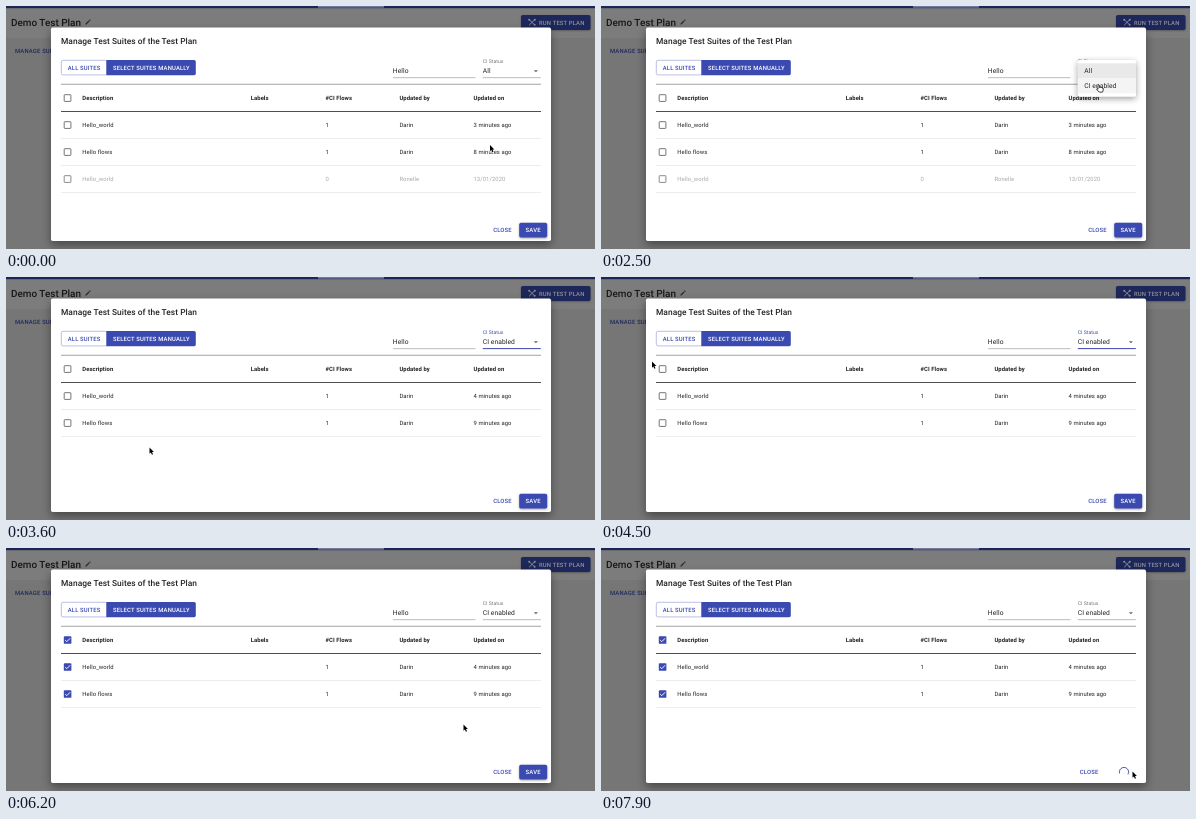
Animation, 589 px wide and 243 px high, one loop 8 s. Source, as an HTML page with a canvas:

```html
<!DOCTYPE html>
<html lang="en">
<head>
<meta charset="utf-8">
<title>Manage Test Suites</title>
<style>
html, body { margin: 0; width: 100%; height: 100%; overflow: hidden; background: #767676; }
canvas { display: block; width: 589px; height: 243px; }
</style>
</head>
<body>
<canvas id="stage"></canvas>
<script>
const W = 589, H = 243, LOOP = 8000, STEP = 100;
const BLUE = '#3a4ab0', INK = '#232323', DIM = '#a9a9a9';
const BODY = 5.88, FIELD = 6.7;
const OPEN = 1300, PICK = 2600, LOADED = 3300, CHECK = 5400, SAVING = 7400;
const COLS = [76.3, 244.8, 319.5, 393.4, 467.5];

const canvas = document.getElementById('stage');
const ctx = canvas.getContext('2d');
const dpr = window.devicePixelRatio || 1;
canvas.width = Math.round(W * dpr);
canvas.height = Math.round(H * dpr);

// Pointer path: time, x, y of the tip
const PATH = [
  [0, 484, 139], [300, 485, 116], [600, 488, 74], [800, 488, 64.5],
  [1700, 488, 64.5], [1900, 497, 78], [2500, 497, 78.5],
  [2700, 488, 86], [3100, 386, 132.5], [3300, 255, 158.5],
  [3600, 143.5, 170.5], [3800, 143.5, 170.5], [4200, 80, 122], [4500, 51, 84.5],
  [4700, 61, 89.5], [4800, 61, 89.5], [4900, 62.5, 90.5],
  [5500, 62.5, 90.5], [5800, 189, 109], [5900, 189, 109],
  [6200, 457.5, 176.5], [6400, 567.5, 217], [6600, 567.5, 217],
  [6800, 540, 218], [6900, 540, 218], [7200, 531.5, 223.5], [8000, 531.5, 223.5]
];

const clamp = v => Math.max(0, Math.min(1, v));
const between = (t, a, b) => t >= a && t < b;
const smooth = v => v * v * (3 - 2 * v);

function pointerAt(t) {
  let i = 1;
  while (i < PATH.length - 1 && PATH[i][0] < t) i++;
  const [t0, x0, y0] = PATH[i - 1], [t1, x1, y1] = PATH[i];
  const k = clamp((t - t0) / (t1 - t0));
  return [x0 + (x1 - x0) * k, y0 + (y1 - y0) * k];
}

// y is the middle of the capital letters
function text(str, x, y, { size = BODY, weight = 400, color = INK, gap = 0.0107 } = {}) {
  ctx.font = `${weight} ${size}px Roboto, sans-serif`;
  ctx.letterSpacing = gap * size + 'px';
  ctx.textRendering = 'geometricPrecision';
  ctx.fillStyle = color;
  ctx.fillText(str, x, y + size * 0.355);
}

const label = (str, x, y, color) => text(str, x, y, { weight: 500, color, gap: 0.0286 });

function rect(x, y, w, h, color) {
  ctx.fillStyle = color;
  ctx.fillRect(x, y, w, h);
}

function box(x, y, w, h, r, color) {
  ctx.beginPath();
  ctx.roundRect(x, y, w, h, r);
  ctx.fillStyle = color;
  ctx.fill();
}

function shadowBox(x, y, w, h, r, color, blur, dy, alpha) {
  ctx.save();
  ctx.shadowColor = `rgba(0,0,0,${alpha})`;
  ctx.shadowBlur = blur * dpr;
  ctx.shadowOffsetY = dy * dpr;
  box(x, y, w, h, r, color);
  ctx.restore();
}

function line(points, color, width) {
  ctx.beginPath();
  points.forEach(([x, y]) => ctx.lineTo(x, y));
  ctx.strokeStyle = color;
  ctx.lineWidth = width;
  ctx.stroke();
}

function shape(points, color) {
  ctx.beginPath();
  points.forEach(([x, y]) => ctx.lineTo(x, y));
  ctx.closePath();
  ctx.fillStyle = color;
  ctx.fill();
}

function drawPage() {
  rect(0, 0, W, H, '#767676');
  rect(0, 0, W, 32, '#7c7c7c');
  rect(0, 0, W, 2.2, '#1c2556');
  rect(312, 0, 66, 1.6, '#747ba0');
  text('Demo Test Plan', 5, 16.6, { size: 9.95, weight: 500, color: '#171717', gap: 0 });
  line([[79.6, 18.4], [83, 15]], '#252525', 1.2);
  line([[83.5, 14.5], [84.3, 13.7]], '#252525', 1.3);
  label('MANAGE SUITES', 9, 45, '#202a5c');

  shadowBox(515, 9, 69.5, 15, 1.7, '#1d2759', 2, 0.8, 0.3);
  const tone = '#8d8f9c';
  line([[523.2, 19.2], [528.8, 13.6]], tone, 1);
  line([[523.4, 13.8], [528.6, 18.8]], tone, 0.9);
  for (const [x, y] of [[523.2, 13.8], [528.8, 13.8], [528.6, 18.8]]) box(x - 1, y - 1, 2, 2, 1, tone);
  label('RUN TEST PLAN', 533, 16.6, '#8f919e');
}

function drawDialog() {
  shadowBox(45, 21.5, 500, 213.5, 1.7, '#fff', 10, 4, 0.4);
  text('Manage Test Suites of the Test Plan', 55, 35, { size: 8.4, weight: 500, gap: 0.004 });

  ctx.beginPath();
  ctx.roundRect(55.3, 54.3, 46, 14.6, 1.7);
  ctx.strokeStyle = '#9ea5d8';
  ctx.lineWidth = 0.7;
  ctx.stroke();
  label('ALL SUITES', 61.7, 61.7, BLUE);
  box(100.3, 54, 89.5, 15.2, [0, 1.7, 1.7, 0], BLUE);
  label('SELECT SUITES MANUALLY', 107, 61.7, '#fff');
  rect(55, 77.8, 480, 0.8, '#8c8c8c');
}

function drawFilters(t) {
  const focused = between(t, OPEN + 100, CHECK);
  const open = between(t, OPEN, PICK);
  text('Hello', 386.8, 65, { size: FIELD });
  rect(387, 71.5, 82.5, 0.6, '#8f8f8f');

  text('CI Status', 476.8, 54.8, { size: 5.03, color: focused ? BLUE : '#757575' });
  text(t < PICK ? 'All' : 'CI enabled', 476.8, 65, { size: FIELD });
  if (focused) rect(476.8, 71.1, 58, 1, BLUE);
  else rect(476.8, 71.5, 58, 0.6, '#8f8f8f');
  const d = open ? -1 : 1;
  shape([[527.8, 65.2 - d], [532, 65.2 - d], [529.9, 65.2 + d * 1.1]], '#666');
}

function drawCheck(y, on, color = '#5e5e5e') {
  if (!on) {
    ctx.beginPath();
    ctx.roundRect(58.2, y - 3.3, 6.7, 6.7, 0.5);
    ctx.strokeStyle = color;
    ctx.lineWidth = 0.85;
    ctx.stroke();
    return;
  }
  box(57.8, y - 3.8, 7.6, 7.6, 0.9, BLUE);
  line([[59.2, y + 0.1], [60.8, y + 1.7], [64.1, y - 1.7]], '#fff', 0.95);
}

function drawRow(y, cells, on, color, boxColor) {
  drawCheck(y, on, boxColor);
  cells.forEach((c, i) => text(c, COLS[i], y, { color }));
  rect(55, y + 13.2, 480, 0.6, '#e2e2e2');
}

function drawTable(t) {
  const on = t >= CHECK, late = t >= LOADED;
  drawCheck(92, on);
  ['Description', 'Labels', '#CI Flows', 'Updated by', 'Updated on'].forEach((s, i) =>
    text(s, COLS[i], 92, { weight: 700 }));
  rect(55, 105, 480, 0.9, '#3c3c3c');
  drawRow(119, ['Hello_world', '', '1', 'Darin', (late ? 4 : 3) + ' minutes ago'], on);
  drawRow(146, ['Hello flows', '', '1', 'Darin', (late ? 9 : 8) + ' minutes ago'], on);
  if (!late) drawRow(173, ['Hello_world', '', '0', 'Ronelle', '13/01/2020'], false, DIM, '#777');
}

// Arc grows, then its tail catches up, while the whole turns
function drawSpinner(x, y, r, width, elapsed) {
  const p = (elapsed / 1400) % 1;
  const grow = smooth(clamp(p * 2)), chase = smooth(clamp(p * 2 - 1));
  const unit = 2 * Math.PI / 126.9;
  const head = (15 * grow + 110 * chase) * unit;
  const length = Math.min(1 + 99 * grow, 126.9 - 15 * grow - 110 * chase) * unit;
  const start = p * 2 * Math.PI + head;
  ctx.beginPath();
  ctx.arc(x, y, r, start, start + length);
  ctx.strokeStyle = BLUE;
  ctx.lineWidth = width;
  ctx.stroke();
}

function drawActions(t) {
  if (t >= SAVING) {
    label('CLOSE', 478.8, 224.2, BLUE);
    drawSpinner(523, 224, 4.6, 0.95, t - SAVING);
    return;
  }
  label('CLOSE', 487.2, 224.2, BLUE);
  const hover = t >= 7200;
  shadowBox(513.2, 216.8, 28, 14.6, 1.7, hover ? '#303f9f' : BLUE, 2.5, 1, 0.35);
  label('SAVE', 519.6, 224.2, '#fff');
}

function drawMenu(t) {
  if (!between(t, OPEN, PICK + 200)) return;
  const grow = clamp((t - OPEN + 100) / 400);
  const fade = t < PICK ? grow : 0.65 - (t - PICK) / 250;
  ctx.save();
  ctx.globalAlpha = clamp(fade);
  if (t < PICK) {
    const s = 1 - Math.pow(1 - grow, 2);
    ctx.translate(477, 65);
    ctx.scale(0.94 + 0.06 * s, 0.75 + 0.25 * s);
    ctx.translate(-477, -65);
  }
  shadowBox(476.8, 54, 58.2, 36.8, 1.7, '#fff', 6, 2, 0.38);
  rect(476.8, 57.3, 58.2, 15, '#e9e9e9');
  if (t >= 1900) rect(476.8, 72.3, 58.2, 15, '#f4f4f4');
  text('All', 483.3, 65, { size: FIELD });
  text('CI enabled', 483.3, 79.8, { size: FIELD });
  ctx.restore();
}

function drawArrow() {
  ctx.beginPath();
  [[0, 0], [0, 6.3], [1.4, 5], [2.4, 7.3], [3.5, 6.8], [2.5, 4.6], [4.4, 4.5]]
    .forEach(([x, y]) => ctx.lineTo(x, y));
  ctx.closePath();
}

function drawHand() {
  ctx.beginPath();
  ctx.moveTo(0, 0.8);
  ctx.quadraticCurveTo(0.7, -0.5, 1.4, 0.8);
  ctx.lineTo(1.5, 3);
  ctx.quadraticCurveTo(2.4, 2.4, 2.9, 3.2);
  ctx.quadraticCurveTo(3.8, 2.7, 4.2, 3.5);
  ctx.quadraticCurveTo(5.2, 3.2, 5.3, 4.2);
  ctx.quadraticCurveTo(5.4, 6, 4.5, 7.6);
  ctx.lineTo(1.2, 7.6);
  ctx.lineTo(-1.4, 4.8);
  ctx.quadraticCurveTo(-1.4, 3.7, 0, 4.7);
  ctx.closePath();
}

function drawPointer(t) {
  const [x, y] = pointerAt(t);
  const hand = between(t, 700, 2700) || between(t, 4900, 5600) || between(t, 7100, SAVING);
  ctx.save();
  ctx.translate(x, y);
  ctx.lineJoin = 'round';
  if (hand) {
    drawHand();
    ctx.fillStyle = '#fff';
    ctx.fill();
    ctx.strokeStyle = '#111';
    ctx.lineWidth = 0.8;
    ctx.stroke();
  } else {
    drawArrow();
    ctx.strokeStyle = '#fff';
    ctx.lineWidth = 1;
    ctx.stroke();
    ctx.fillStyle = '#000';
    ctx.fill();
  }
  ctx.restore();
}

function draw(t) {
  ctx.setTransform(dpr, 0, 0, dpr, 0, 0);
  drawPage();
  drawDialog();
  drawFilters(t);
  if (between(t, PICK, LOADED)) drawSpinner(295, 149.7, 9.8, 1.7, t - PICK + 45);
  else drawTable(t);
  drawActions(t);
  drawMenu(t);
  drawPointer(t);
}

const begin = performance.now();
function tick() {
  const t = (performance.now() - begin) % LOOP;
  draw(Math.floor(t / STEP) * STEP);
  requestAnimationFrame(tick);
}
tick();
</script>
</body>
</html>
```
